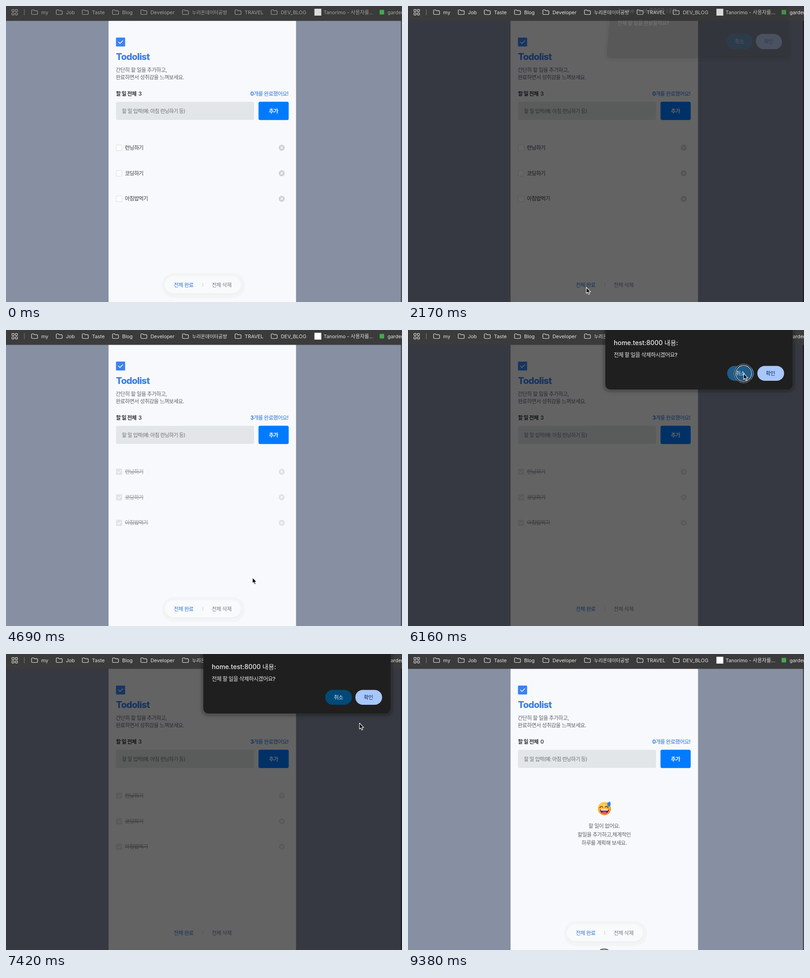
An HTML page that plays this animation: 866 px wide and 647 px high, repeating every 9450 ms.

```html
<!DOCTYPE html>
<html lang="ko">
<head>
<meta charset="utf-8">
<title>Todolist</title>
<style>
html, body { margin: 0; width: 100%; height: 100%; overflow: hidden; background: #878fa3; }
main { position: relative; width: 100%; height: 100%; overflow: clip; contain: paint; }
svg { position: absolute; left: 0; top: 0; width: 866px; height: 647px; overflow: hidden; }
text { font: 400 11.6px Inter, "Noto Sans CJK KR", "Noto Sans CJK", sans-serif; letter-spacing: -.05em; white-space: pre; }
.bar text { font-size: 10.9px; letter-spacing: 0; fill: currentColor; }
.bar .ko { font-size: 10.4px; }
.m { font-weight: 500; }
.b { font-weight: 700; }
.mid { text-anchor: middle; }
.end { text-anchor: end; }
.line { fill: none; stroke: currentColor; stroke-width: 1.2; }
.check { fill: none; stroke: #fff; stroke-linecap: round; stroke-linejoin: round; }
.dialog { transform-origin: 636px 130px; overflow: visible; }
.dialog .panel { filter: drop-shadow(0 3px 6px rgba(0,0,0,.22)); }
.pointer { overflow: visible; }
</style>
</head>
<body>
<main>
<svg viewBox="0 0 866 647">
  <rect width="866" height="647" fill="#878fa3"/>
  <rect x="224.3" width="410" height="647" fill="#f8f9fc"/>

  <rect x="240.5" y="69" width="20" height="19.5" rx="1.5" fill="#3b82f1"/>
  <path class="check" d="M246 78.8l3.2 3.2 6-6" stroke-width="1.6"/>
  <text x="240.5" y="118" fill="#3d80e6" style="font-size:20px;font-weight:800;letter-spacing:-.04em">Todolist</text>
  <g fill="#5d6268">
    <text x="240" y="144">간단히 할 일을 추가하고,</text>
    <text x="240" y="160">완료하면서 성취감을 느껴보세요.</text>
  </g>
  <text class="b" x="240.5" y="196" fill="#2c3036">할 일 전체</text>
  <g fill="#4d525a">
    <text class="b total3" x="289.5" y="196">3</text>
    <text class="b empty" x="289.5" y="196">0</text>
  </g>
  <g fill="#2f76d6">
    <text class="m end none" x="617.5" y="196"><tspan class="b">0</tspan>개를 완료했어요!</text>
    <text class="m end done" x="617.5" y="196"><tspan class="b">3</tspan>개를 완료했어요!</text>
  </g>
  <rect x="240.5" y="209.5" width="302" height="39.5" rx="3" fill="#e3e6e8"/>
  <text x="253.5" y="234" fill="#6a6f75" style="font-size:11.1px">할 일 입력(예: 아침 런닝하기 등)</text>
  <rect x="552.2" y="209.3" width="66" height="40" rx="3.5" fill="#007bff"/>
  <text class="b mid" x="585" y="234" fill="#fff">추가</text>

  <g class="idle" id="idle"></g>
  <g class="done" id="done"></g>

  <g class="empty">
    <defs><radialGradient id="face" cx=".4" cy=".3" r=".8">
      <stop offset="0" stop-color="#ffd75a"/><stop offset=".6" stop-color="#f9b23c"/><stop offset="1" stop-color="#e5793a"/>
    </radialGradient></defs>
    <circle cx="429.5" cy="338" r="15.6" fill="#fff"/>
    <circle cx="429.5" cy="338" r="14.5" fill="url(#face)"/>
    <path d="M419.5 336q3-5 6.5-1M431 335q3.5-4 6.5 1" fill="none" stroke="#5a2f1c" stroke-width="1.7" stroke-linecap="round"/>
    <path d="M419.5 339.5h20q-1 9.5-10 9.5t-10-9.5z" fill="#7c1738"/>
    <path d="M421 339.5h17l-1 2.8h-15z" fill="#fff"/>
    <ellipse cx="429.5" cy="346.5" rx="5" ry="2.2" fill="#ec4b86"/>
    <path d="M436 325q3-2 6.5-2 1 5 .2 8-1.2 3-3.7 2.5-3-.5-3-3.5z" fill="#2b83dd"/>
    <g class="mid" fill="#5d6268">
      <text x="429" y="380">할 일이 없어요.</text>
      <text x="429" y="398.5">할일을 추가하고,체계적인</text>
      <text x="429" y="416.5">하루를 계획해 보세요.</text>
    </g>
  </g>

  <g class="pill">
    <rect x="341" y="584" width="182" height="54" rx="27" fill="#f2f4f5"/>
    <rect x="347" y="592" width="168" height="37.5" rx="18.7" fill="#eceeef"/>
    <rect x="347" y="591" width="167" height="37" rx="18.5" fill="#f9fafc"/>
  </g>
  <text class="m" x="367" y="614" fill="#3375cf">전체 완료</text>
  <path d="M430.5 605v9" stroke="#c9ccd0"/>
  <text x="450" y="614" fill="#777b80">전체 삭제</text>

  <rect x="863.5" y="32" width="2.5" height="615" fill="#4a4d55"/>
  <rect class="shade" y="32" width="866" height="615" fill="#000" fill-opacity=".6"/>

  <g class="bar" id="bar">
    <rect width="866" height="32.5" fill="#3b3b3b"/>
    <path d="M40 7v13" stroke="#6c6c6c" stroke-width="1.5"/>
  </g>
</svg>

<svg class="dialog" viewBox="0 0 866 647">
  <rect x="425.5" y="-20" width="422" height="156.5" rx="15" fill="#000" fill-opacity=".09"/>
  <rect class="panel" x="431.5" y="-20" width="409.5" height="150" rx="11" fill="#1f1f1f"/>
  <text class="m" x="450" y="32.5" fill="#ececec" style="font-size:14px;letter-spacing:0">home.test:8000 내용:</text>
  <g fill="#e6e6e6">
    <text class="m ask1" x="450" y="59" style="font-size:12px">전체 할 일을 완료할까요?</text>
    <text class="m ask2" x="450" y="59" style="font-size:12px">전체 할 일을 삭제하시겠어요?</text>
  </g>
  <rect class="cancel" x="698" y="78.5" width="58.5" height="32.5" rx="16.25" fill="#004a77"/>
  <text class="m mid" x="727" y="99" fill="#d5e9fb">취소</text>
  <rect class="ok" x="764" y="78.5" width="58.5" height="32.5" rx="16.25" fill="#a8c7fa"/>
  <text class="m mid" x="792.5" y="99" fill="#0b2f6b">확인</text>
</svg>

<svg class="pointer" viewBox="0 0 866 647">
  <g class="ring" fill="none">
    <circle r="20.3" stroke="#fff" stroke-opacity=".75"/>
    <circle r="19" stroke="#000" stroke-width="1.6"/>
    <circle r="17.6" stroke="#fff" stroke-opacity=".85" stroke-width="1.2"/>
  </g>
  <path d="M0 0v13.2l3-2.7 2 4.7 2.3-1-2-4.5h4z" fill="#000" stroke="#fff" stroke-width="1.1" stroke-linejoin="round"/>
</svg>
</main>

<script>
const T = 9450;
const $ = id => document.getElementById(id);

// Bookmarks bar
const folders = [[55, 'my'], [109, 'Job'], [166, 'Taste'], [232, 'Blog'], [294, 'Developer'],
  [385, '누리온데이터공방'], [500, 'TRAVEL'], [579, 'DEV_BLOG']];
const folderPath = 'M.9 2.4Q.9 1 2.3 1H5.5L7.2 2.8H12.6Q14 2.8 14 4.2V9.6Q14 11 12.6 11H2.3Q.9 11 .9 9.6Z';
let bar = '';
for (const x of [13, 20.5]) for (const y of [7.5, 15])
  bar += `<rect class="line" x="${x}" y="${y}" width="4.6" height="4.6" rx=".8"/>`;
for (const [x, name] of folders)
  bar += `<path class="line" d="${folderPath}" transform="translate(${x} 7.5)"/>
    <text class="${name > '가' ? 'ko' : ''}" x="${x + 22}" y="17.5">${name}</text>`;
bar += `<rect class="tile" x="674.5" y="6" width="15" height="15"/>
  <text x="694.5" y="17.5">Tanorimo - 사용자를...</text>
  <rect x="817" y="8.5" width="10" height="10" rx="1" fill="#45a94d"/>
  <text x="834.5" y="17.5">garden</text>`;
$('bar').insertAdjacentHTML('beforeend', bar);

// Todo rows, open and completed
['런닝하기', '코딩하기', '아침밥먹기'].forEach((name, i) => {
  const y = 309.8 + i * 55.8;
  const remove = color => `<circle cx="603" cy="${y}" r="6.5" fill="${color}"/>
    <path class="check" d="M600.7 ${y - 2.3}l4.6 4.6m0-4.6l-4.6 4.6" stroke-width="1.3"/>`;
  $('idle').innerHTML += `<rect x="241" y="${y - 6.2}" width="12.5" height="12.5" rx="1" fill="#fff" stroke="#d6d9dd"/>
    <text class="m" x="260" y="${y + 4}" fill="#33373c">${name}</text>` + remove('#cfd0d2');
  $('done').innerHTML += `<rect x="240.5" y="${y - 6.7}" width="13.5" height="13.5" rx="1.5" fill="#e1e3e5"/>
    <path class="check" d="M244 ${y}l2.5 2.5 4.5-4.5" stroke-width="1.4"/>
    <text class="m" x="260" y="${y + 4}" fill="#8b8f94" text-decoration="line-through">${name}</text>` + remove('#dfe0e2');
});

// rows: [time, value], held from the loop start and to its end
function track(selector, prop, rows, easing = 'step-end') {
  const all = [...rows];
  if (all[0][0] > 0) all.unshift([0, all[0][1]]);
  if (all.at(-1)[0] < T) all.push([T, all.at(-1)[1]]);
  const frames = all.map(([t, value]) => ({ offset: t / T, [prop]: value, easing }));
  document.querySelectorAll(selector).forEach(el =>
    el.animate(frames, { duration: T, iterations: Infinity }));
}
function show(selector, ...spans) {
  const rows = spans.flatMap(([a, b]) => [[a, 1], [b, 0]]);
  track(selector, 'opacity', rows[0][0] > 0 ? [[0, 0], ...rows] : rows);
}

const completed = 4200, cleared = 8330;
show('.idle', [0, completed]);
show('.done', [completed, cleared]);
show('.empty', [cleared, T]);
show('.total3', [0, cleared]);
show('.none', [0, completed], [cleared, T]);
show('.ask1', [0, 4600]);
show('.ask2', [4600, T]);
track('.bar', 'color', [[0, '#a0a0a0'], [1400, '#e2e2e2']]);
track('.tile', 'fill', [[0, '#dcdcdc'], [1400, '#ffffff']]);

// Dialog: dim the page, then tilt the panel in
const dialogs = [[2100, 4130], [5250, 6220], [6930, 8270]];
const flat = 'translateY(0px) perspective(400px) rotateX(0deg) scale(1, 1)';
const tilted = 'translateY(-16px) perspective(400px) rotateX(10deg) scale(.99, 1.07)';
const dim = (off, on) => dialogs.flatMap(([a, b]) =>
  [[a - 20, off], [a + 60, on], [b, on], [b + 110, off]]);
track('.shade', 'opacity', dim(0, 1), 'linear');
track('.pill', 'opacity', dim(1, 0), 'linear');
track('.dialog', 'opacity', dialogs.flatMap(([a, b]) =>
  [[a + 40, 0], [a + 70, .17], [a + 210, 1], [b, 1], [b + 110, 0]]), 'linear');
track('.dialog', 'transform', dialogs.flatMap(([a, b]) =>
  [[a + 70, tilted], [a + 240, flat], [b, flat], [b + 110, tilted]]), 'ease-out');

const cancel = ['#004a77', '#17577f', '#1f5b88'], ok = ['#a8c7fa', '#9ab8ec', '#8faadf'];
const button = (selector, colors, rows) =>
  track(selector, 'fill', rows.map(([t, state]) => [t, colors[state]]));
button('.cancel', cancel, [[0, 0], [3220, 1], [3560, 0], [5820, 1], [6110, 2], [6400, 0]]);
button('.ok', ok, [[0, 0], [2720, 1], [2800, 0], [3120, 1], [3200, 0], [3640, 1], [4050, 2], [4400, 0], [7760, 1], [8180, 2], [8500, 0]]);

// Pointer path and clicks
const path = [[700, 429, 664], [1050, 402, 627], [1330, 393, 619], [1890, 390, 615], [2240, 390, 615],
  [2700, 780, 112], [2870, 842, 100], [3050, 842, 100], [3400, 735, 95], [3920, 794, 97], [4170, 794, 97],
  [4550, 539, 541], [4690, 539, 541], [5040, 472, 612], [5380, 472, 612], [5900, 734, 95], [6240, 734, 95],
  [6700, 472, 612], [7060, 472, 612], [7420, 773, 151], [7560, 784, 117], [7630, 784, 117], [7910, 793, 97],
  [8330, 793, 97], [8930, 429, 664]];
track('.pointer', 'transform', path.map(([t, x, y]) => [t, `translate(${x}px, ${y}px)`]), 'ease-in-out');
show('.ring', [1330, 1470], [2020, 2090], [4050, 4130], [5170, 5250], [6110, 6220], [6850, 6930], [8180, 8270], [9375, T]);
</script>
</body>
</html>
```
